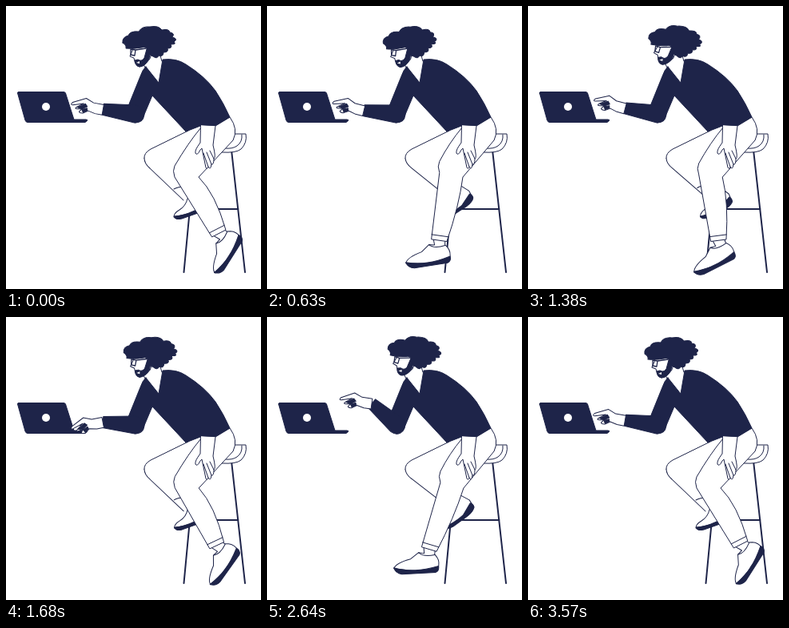
An HTML page for the animation above (3600 ms loop, 319x354 px).

```html
<!DOCTYPE html>
<html lang="en">
<head>
<meta charset="utf-8">
<title>Man at a laptop</title>
<style>
  html, body { margin: 0; width: 100%; height: 100%; overflow: hidden; background: #fff; }
  svg { display: block; width: 100vw; height: 100vh; }
  path, circle { fill: #fff; stroke: #1e2449; stroke-width: 1; stroke-linejoin: round; stroke-linecap: round; }
  .dark { fill: #1e2449; }
  .line { fill: none; }
  .bare { stroke: none; }
</style>
</head>
<body>
<svg viewBox="0 0 319 354">
  <g id="laptop">
    <path class="dark" d="M16 107.500H72Q74 107.500 74.500 109L85 142H100Q103 142 101 144L99 145.500H27Q25 145.500 24 143L14.500 109Q14 107.500 16 107.500Z"/>
    <circle class="bare" cx="50" cy="126" r="5"/>
  </g>

  <g id="stool">
    <path class="line" stroke-width="2" style="stroke-width:2" d="M236 190 222.500 333M282 180 299 333M230 254H290.500"/>
    <path d="M270 160H300Q302 171 294 179Q288 184 270 183Z"/>
    <path class="line" d="M295 161Q296 170 289 175Q283 179 274 178"/>
  </g>

  <g id="farShin">
    <g id="farFoot">
      <path d="M210 264Q210 259 217 255Q225 250 227 241L240 231L249 240L252 250L236 258Z"/>
      <path class="dark" d="M210 263Q221 263 236 256L249 244Q254 248 251 252Q247 257 237 260L220 266Q211 268 210 263Z"/>
    </g>
    <path class="bare" d="M174 185 173 192Q174 198 180 203L222 243L238 229L205 180Z"/>
    <path class="line" d="M173 190Q173 197 180 203L222 243M210 229Q215 226 224 226"/>
  </g>
  <path class="bare" d="M225 157 180 180Q172 184 173 191L215 205L250 156Z"/>
  <path class="line" d="M228 156 181 179Q172 184 173 191"/>

  <g id="nearFoot">
    <path d="M-8 -4 -7 9 -14 8 -24 16Q-43 21 -45 28L-20 31L10 29Q13 20 9 14L6 10 8 -4Z"/>
    <path class="line" d="M-14 8Q-8 14 6 11"/>
    <path class="dark" d="M-45 27Q-30 31 -18 30Q-6 30 11 25Q12 31 7 33L-35 35Q-43 34 -45 27Z"/>
  </g>
  <path id="nearLeg"/>
  <path id="hem" class="line"/>

  <path class="bare" d="M170 73 180 66 184 58 195 61 198 68 191 97Z"/>
  <path class="line" d="M172 73 175 79M193 62 195 69"/>
  <path class="dark" d="M175 76 191 96 196 67Q213 65 225 73Q249 88 262 106Q272 121 280 139L263 149 243 150 225 157 183 112 172 138Q167 146 161 146L151 130L168 88Q171 79 175 76Z"/>
  <path d="M243.500 149 243 171Q236 180 237 184Q239 188 243 180L245 178 250 202Q252 205 253 201Q256 206 257 198Q260 199 260 191Q263 190 259 174L262 150Z"/>
  <path class="line" d="M247 184 253 201M251 183 257 198M255 181 260 191"/>

  <g id="forearm">
    <path class="dark" d="M0 -11 -41 -7V7L0 11Q11 10 11 0Q10 -9 0 -11Z"/>
    <g id="hand">
      <path d="M0 -6 -13 -6 -23 -10 -39 -2Q-42 2 -38 1L-25 -3 -33 3Q-36 6 -31 5L-26 4 -29 8Q-28 10 -24 9L-18 5 -9 7H0Z"/>
      <path class="dark" d="M-32 3 -23 -3 -20 0 -26 4ZM-26 5 -20 2 -19 5 -24 8Z"/>
    </g>
  </g>

  <g id="head">
    <path d="M159 50 158 56 155 63 160 65 161 69Q162 75 167 76Q174 74 180 66L184 50Z"/>
    <path class="dark" d="M176 54 173 65Q170 70 165 67L161 68Q162 75 167 76Q174 76 179 66L181 54Z"/>
    <path class="bare" d="M163 71 167 69 167 72Z"/>
    <path class="line" style="stroke-width:1.300" d="M156 54 162 55 161 62 156 61ZM162 55 175 53"/>
    <path class="dark" d="M146 46Q145 39 153 37Q155 31 166 32Q170 25 180 26Q191 24 195 30Q204 28 205 33Q212 34 208 39Q216 41 210 45Q214 48 206 48Q209 53 202 53Q204 58 197 58Q197 64 191 62Q189 67 184 63Q179 62 177 55Q175 50 170 52Q160 54 150 53Q151 49 146 46Z"/>
  </g>
</svg>
<script>
const LOOP = 3600, SWING = 1800;
const times = [0, 630, 1080, 1680, 2130, 2640, LOOP];
const poses = {
  forearm: [8, 6, 15, 5, 17.5, 41, 8],
  hand: [10, 14, 41, -11, 8, 8, 10],
  head: [0, -1, 13, 2, 8, 8, 0]
};
const $ = id => document.getElementById(id);
const put = (id, value) => $(id).setAttribute('transform', value);
const mix = (a, b, k) => a + (b - a) * k;

function pose(values, t) {
  let i = 0;
  while (t >= times[i + 1]) i++;
  const k = (t - times[i]) / (times[i + 1] - times[i]);
  return mix(values[i], values[i + 1], (1 - Math.cos(Math.PI * k)) / 2);
}

function drawNearLeg(swing) {
  const angle = (5 + 22 * swing) * Math.PI / 180;
  const sin = Math.sin(angle), cos = Math.cos(angle);
  // Point measured along and across the shin from the knee.
  const at = (along, across) =>
    (227 + sin * along + cos * across).toFixed(2) + ' ' + (208 + cos * along - sin * across).toFixed(2);
  const back = (1 - swing) / 2;
  const kx = mix(208, 214, back), ky = mix(206, 199, back);
  $('nearLeg').setAttribute('d',
    `M244 152Q228 171 ${kx + 3} ${ky - 6}Q${kx} ${ky} ${kx + 3} ${ky + 8}` +
    `L${at(86, -9.5)}L${at(86, 10)}Q${at(40, 19)} ${mix(241, 246, back)} 214` +
    `L284 168Q291 154 280 139L262 150Z`);
  $('hem').setAttribute('d', `M${at(80, -10)}L${at(80, 11)}`);
  const tilt = 55 * Math.pow((1 + swing) / 2, 1.4);
  put('nearFoot', `translate(${at(82, 0)}) rotate(${-tilt})`);
}

function draw(now) {
  const t = now % LOOP;
  const swing = Math.cos(2 * Math.PI * t / SWING);
  const back = (1 - swing) / 2;
  const arm = pose(poses.forearm, t);
  put('forearm', `translate(162 135) rotate(${arm})`);
  put('hand', `translate(-41 0) rotate(${pose(poses.hand, t) - arm})`);
  put('head', `rotate(${pose(poses.head, t)} 190 80)`);
  put('farShin', `rotate(${-6 * back} 178 190)`);
  put('farFoot', `rotate(${-11 * back} 230 240)`);
  drawNearLeg(swing);
}

const start = performance.now();
function tick() {
  draw(performance.now() - start);
  requestAnimationFrame(tick);
}
tick();
</script>
</body>
</html>
```
